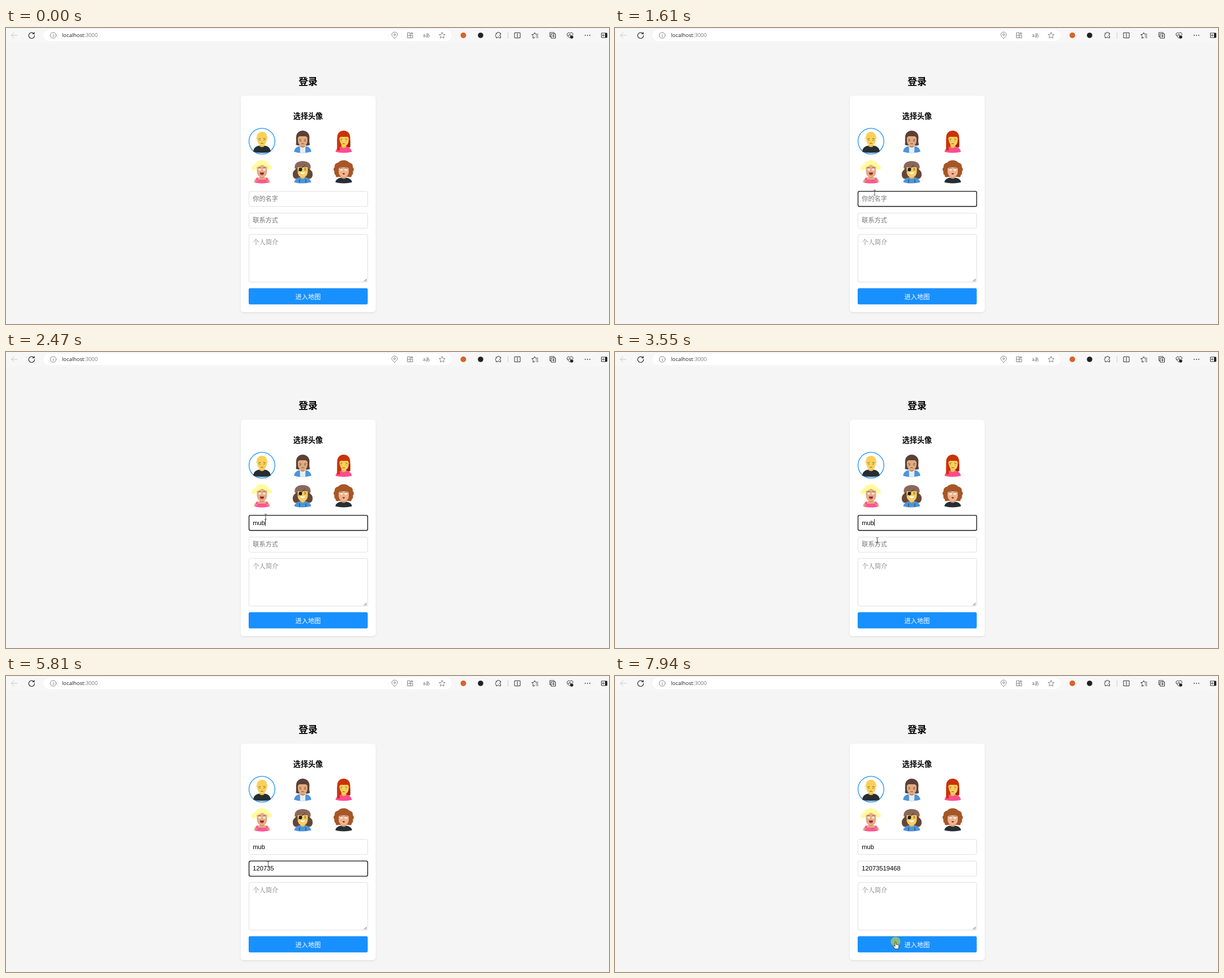
These frames come from a looping animation (1066x525 px, 8 s). An HTML page:

```html
<!DOCTYPE html>
<html lang="zh-CN">
<head>
<meta charset="utf-8">
<title>登录</title>
<style>
html, body { margin: 0; width: 100%; height: 100%; overflow: hidden; background: #f5f5f5; }
svg { display: block; }
text { font: 11.2px "Liberation Sans", "Noto Sans CJK SC", "Noto Sans CJK", sans-serif; white-space: pre; }
.cn { font-family: "Noto Sans CJK SC", "Noto Sans CJK", sans-serif; }
.mid { text-anchor: middle; }
.hint { fill: #757575; }
.box { fill: #fff; stroke: #d9d9d9; stroke-width: .8; }
.box.on { stroke: #101010; stroke-width: 1.3; }
.line { fill: none; stroke: #333; stroke-width: 1; stroke-linecap: round; stroke-linejoin: round; }
.soft { stroke: #777; stroke-width: .9; }
.face { stroke-width: .75; }
</style>
</head>
<body>
<svg width="1066" height="525" viewBox="0 0 1066 525">
  <defs>
    <clipPath id="round"><path d="M-25-25H25V11C21 17 14 20.5 0 20.5S-21 17-25 11Z"/></clipPath>
    <filter id="shade" x="-10%" y="-10%" width="120%" height="120%">
      <feDropShadow dx="0" dy="1.2" stdDeviation="1.8" flood-opacity=".1"/>
    </filter>
  </defs>

  <!-- browser bar -->
  <rect width="1066" height="26" fill="#f7f7f7"/>
  <rect x="65" y="2" width="724" height="22" rx="11" fill="#fff" stroke="#eee" stroke-width=".8"/>
  <g class="line">
    <path d="M19.5 13H9.5M14 8.5 9.5 13 14 17.5" stroke="#c8c8c8"/>
    <path d="M49.5 10.2A5.2 5.2 0 1 0 50.5 13M50 7.5V10.5H47" stroke-width="1.2"/>
    <g class="soft">
      <circle cx="83.5" cy="13" r="5.2"/><path d="M83.5 12.5V15.5M83.5 10.4V10.5"/>
      <path d="M687 18.5C684.5 16 682 14 682 11.8A5 4.6 0 0 1 692 11.8C692 14 689.5 16 687 18.5Z"/><circle cx="687" cy="11.8" r="1.6"/>
      <path d="M710 8.5H714.5V17.5H710ZM710 13H719V17.5H714.5M717.5 7.5V11.5M715.5 9.5H719.5"/>
      <path d="M771 7.8 772.6 11.2 776.3 11.6 773.6 14.2 774.3 18 771 16.1 767.7 18 768.4 14.2 765.7 11.6 769.4 11.2Z"/>
    </g>
    <path d="M866.5 9H869A1.6 1.6 0 0 1 872.2 9H874.5V11.5A1.6 1.6 0 0 0 874.5 14.7V17.5H872A1.6 1.6 0 0 0 868.8 17.5H866.5V15A1.8 1.8 0 0 1 866.5 11.5Z"/>
    <path d="M887.5 8V18" stroke="#ccc"/>
    <path d="M902.5 8.5H899V17.5H902.5M905.5 8.5H909V17.5H905.5M904 7.5V18.5"/>
    <path d="M935 17 931.5 18 932 14.5 929.5 11.7 933 11.2 934.5 8 936.2 11H940.5M937 14H940.5M938 17H940.5"/>
    <path d="M963.5 15.5H961.5V8H969V9.5M964 10.5H971.5V18H964ZM967.8 12.3V16.2M965.8 14.2H969.8"/>
    <path d="M997 18 992.5 13.5A2.9 2.9 0 0 1 997 9.5 2.9 2.9 0 0 1 1002 12.5M993 13H995.5L997 11 998 14"/>
    <path d="M1053 9H1062V17H1053ZM1054.5 13H1058M1056 11.5 1054.5 13 1056 14.5"/>
  </g>
  <circle cx="1000" cy="16" r="2.8" fill="#222"/>
  <path d="M1059 9H1063V17H1059Z" fill="#222"/>
  <g fill="#333"><circle cx="1024" cy="13" r=".9"/><circle cx="1028" cy="13" r=".9"/><circle cx="1032" cy="13" r=".9"/></g>
  <circle cx="808.5" cy="13" r="5" fill="#d9622b"/>
  <circle cx="839" cy="13" r="4.8" fill="#222"/>
  <text x="737" y="16" class="cn" style="font-size:8px" fill="#666">aあ</text>
  <text x="99" y="16.4" style="font:9.35px 'Open Sans', sans-serif" fill="#222">localhost<tspan fill="#777">:3000</tspan></text>

  <!-- form -->
  <text x="534" y="101.4" class="cn mid" style="font-size:16.8px;font-weight:700">登录</text>
  <rect x="415" y="120" width="238.5" height="384" rx="5.6" fill="#fff" filter="url(#shade)"/>
  <text x="534" y="161" class="cn mid" style="font-size:13.1px;font-weight:700">选择头像</text>
  <circle cx="452.5" cy="200.8" r="22.9" fill="none" stroke="#1890ff" stroke-width="1.3"/>

  <g transform="translate(452.5 201)" clip-path="url(#round)">
    <path d="M-15.5 20C-15.5 11-10 8.5-4 7.5H4C10 8.5 15.5 11 15.5 20V22H-15.5Z" fill="#262e33"/>
    <path d="M-4 3H4V9Q0 11.5-4 9Z" fill="#f0be48"/>
    <path d="M0-17C5.5-17 8.8-13 9-8 10-8 10-4 8.6-3.5 8 3.5 4 7.8 0 7.8S-8-3.5-8.6-3.5C-10-4-10-8-9-8-8.8-13-5.5-17 0-17Z" fill="#fad05a"/>
    <path d="M-8.6-3.5C-8 3.5-4 7.8 0 7.8S8 3.5 8.6-3.5Z" fill="#fad05a"/>
    <path class="line face" stroke="#8a6428" d="M-5.8-4-2.8-5.2M5.8-4 2.8-5.2M-4.2-1.8H-3.2M3.2-1.8H4.2M-1.8 3.6Q0 2.4 1.8 3.6"/>
  </g>

  <g transform="translate(524.5 201)" clip-path="url(#round)">
    <path d="M-12 6C-11 1-12-4-11.5-8-11-15-6-19 0-19S11.5-15 12-8C12-3 11 2 13 6 10 8 7 8 5 7H-5C-8 8-10 7-12 6Z" fill="#5a4038"/>
    <path d="M-15.5 21C-15.5 12-10 9.5-5 8.5H5C10 9.5 15.5 12 15.5 21Z" fill="#4c94dc"/>
    <path d="M-5 8.5H5L4.5 21H-4.5Z" fill="#e9edf2"/>
    <path d="M-4 3H4V9.5Q0 13-4 9.5Z" fill="#c98c62"/>
    <path d="M-8.5-9H8.5V-2C8.5 5 4.5 8.5 0 8.5S-8.5 5-8.5-2Z" fill="#e2aa7e"/>
    <path d="M-9-5C-8.5-8-5-9-2-13 2-10 7.5-9.5 9-5L10-13 0-18-10-13Z" fill="#5a4038"/>
    <path class="line face" stroke="#80573a" d="M-5.8-3.4-3-2.6M5.8-3.4 3-2.6M-5.2-.6H-3M5.2-.6H3M-1.8 4.2Q0 3.4 1.8 4.2"/>
  </g>

  <g transform="translate(597 201)" clip-path="url(#round)">
    <path d="M-11.5 16V-7C-11.5-14-7-19 0-19S11.5-14 11.5-6V10Q8 12 4 9V8H-4V16Z" fill="#c93408"/>
    <path d="M7-2H11.5V10Q8 12 5 8Z" fill="#9e2505"/>
    <path d="M-15 21C-14 13-10 10.5-4 9.5H4C10 10.5 14 13 15 21Z" fill="#ff4d8d"/>
    <path d="M-4 3H4V10Q0 14-4 10Z" fill="#f0be48"/>
    <path d="M-8-8H8.8V-2C8.8 5 5 8.5 0 8.5S-8-3-8-8Z" fill="#fad05a"/>
    <path d="M-9-3C-7-8-3-9.5 1-14 3-11 8-9 9.5-4L9-14 0-18-9-14Z" fill="#c93408"/>
    <path d="M-11.5-5H-8L-6.8 16H-11.5Z" fill="#c93408"/>
    <path class="line face" stroke="#8a6428" d="M-5.5-3.2-2.8-4.3M6-3.2 3.2-4.3M-4-1V-.8M4-1V-.8M-1.8 4.4Q0 3.2 1.8 4.4"/>
  </g>

  <g transform="translate(452.5 255)" clip-path="url(#round)">
    <path d="M-18.8-5C-18.5-11-13-12-10.5-16-6-22 6-22 10-16 12.5-12 18-11 18-6 14-3 11-4 9-5H-9C-12-3-16-2-18.8-5Z" fill="#fffb9c"/>
    <path d="M-14.5 21C-14.5 13-10 10.5-4 9.5H4C10 10.5 14.5 13 14.5 21Z" fill="#e8ab83"/>
    <path d="M-10 10.5H-7V14H7V10.5H10L12 21H-12Z" fill="#ff5591"/>
    <path d="M-4 4H4V10Q0 13-4 10Z" fill="#d2916a"/>
    <path d="M-9-9Q0-16 9-9V-1C9 6 5 10 0 10S-9 6-9-1Z" fill="#e8ab83"/>
    <path d="M-10-8.5Q-4-9 0-13 5-9 10-8.5V-15H-10Z" fill="#fffb9c"/>
    <g fill="#fff"><circle cx="-3.8" cy="-4" r="2.1"/><circle cx="3.8" cy="-4" r="2.1"/></g>
    <path class="line face" stroke="#6b4632" d="M-6-7Q-4-7.8-2.5-7M6-7Q4-7.8 2.5-7M-3.8-4V-3.9M3.8-4V-3.9"/>
    <path d="M-3.6 1.6H3.6Q3.2 6 0 6T-3.6 1.6Z" fill="#7b2530"/><path d="M-2 4.8Q0 3.2 2 4.8 0 6.6-2 4.8Z" fill="#ff5a68"/>
    <path d="M-9.5 16V16.1M9 16V16.1" stroke="#fff" stroke-width="1.3" stroke-linecap="round"/>
  </g>

  <g transform="translate(524.5 255)" clip-path="url(#round)">
    <path d="M-11-9C-12-2-17.5-3-17.5 4-18 10-14 14-9 12L0 8 9 12C14 14 18 10 17.5 4 17.5-3 12-2 11-9Z" fill="#66463a"/>
    <path d="M-15.5 21C-15 14-10 11-5 9.5H5C10 11 15 14 15.5 21Z" fill="#4c94dc"/>
    <path d="M-4 4H4V10Q0 15-4 10Z" fill="#f0be48"/>
    <path d="M-9-8H9V-1C9 6 5 10 0 10S-9 6-9-1Z" fill="#fad05a"/>
    <path d="M-14-6C-15-14-10-19 0-19S15-14 14-6Q10-4 9-8H-9Q-10-4-14-6Z" fill="#8b675a"/>
    <path class="line" stroke="#222" d="M-8-1 4-12"/><ellipse cx="-4" cy="-4" rx="3" ry="3.2" fill="#1d1d1d"/>
    <path d="M-5 .8H5Q4.5 4.6 0 4.6T-5 .8Z" fill="#fff" stroke="#c9b078" stroke-width=".5"/>
    <path class="line face" stroke="#6b4a20" d="M2.8-6 6-5.2M2.8-3Q4.5-4.2 6-3"/>
    <path class="line" stroke="#fff" d="M-5.5 14V19M5.5 14V19"/>
  </g>

  <g transform="translate(597 255)" clip-path="url(#round)">
    <path d="M-9 9C-13 11-15 8-14 6-17 5-17 1-16 0-19-3-18-7-16-8-17-13-13-16-10-16-6-22 6-22 10-16 13-16 17-13 16-8 18-7 19-3 16 0 17 1 17 5 14 6 15 8 13 11 9 9Z" fill="#a65728"/>
    <path d="M-15 21C-15 14-10 11.5-5 10.5H5C10 11.5 15 14 15 21Z" fill="#262e33"/>
    <path d="M-4 4H4V11Q0 14-4 11Z" fill="#d99670"/>
    <path d="M-9-8H9V-1C9 6 5 10 0 10S-9 6-9-1Z" fill="#efb48d"/>
    <path d="M-10-4C-8-8-3-8.5 1-12 4-8.5 8-8 10-4L12-12 0-18-12-12Z" fill="#a65728"/>
    <g fill="#fff"><circle cx="-3.8" cy="-3.5" r="2"/><circle cx="3.8" cy="-3.5" r="2"/></g>
    <path class="line face" stroke="#6b4632" d="M-6-6.4Q-4-7.2-2.6-6.4M6-6.4Q4-7.2 2.6-6.4M-3.8-3.5V-3.4M3.8-3.5V-3.4"/>
    <path d="M-2.2 2.6H2.2Q1.6 5 0 5T-2.2 2.6Z" fill="#7b2530"/>
  </g>

  <rect class="box" x="429.6" y="289.6" width="209.8" height="26.9" rx="2.6"/>
  <rect class="box" x="429.6" y="328.2" width="209.8" height="26.9" rx="2.6"/>
  <rect class="box" x="429.6" y="366.2" width="209.8" height="84.5" rx="2.6"/>
  <text class="field" x="436.3" y="306.6"/>
  <text class="field" x="436.3" y="345.3"/>
  <path id="under" d="M436.5 309H446" stroke="#333" stroke-width=".6"/>
  <text class="hint" x="436.5" y="384" style="font-family:'Noto Serif CJK SC','Noto Sans CJK SC','Noto Sans CJK',serif;font-weight:300">个人简介</text>
  <path d="M633 449.5 637.5 445M636 449.5 637.5 448" stroke="#333" stroke-width=".9"/>
  <rect x="429" y="461.5" width="210.5" height="28.7" rx="2.8" fill="#1890ff"/>
  <text x="534" y="481" class="cn mid" fill="#fff">进入地图</text>
  <rect id="caret" width=".9" height="12.4" fill="#111"/>

  <g id="ime"></g>

  <circle id="press" r="8.6" fill="#ffe600" opacity=".5"/>
  <g stroke-linejoin="round" id="pointer">
    <path id="arrow" d="M0 0V11L2.6 8.8 4.3 12.6 6 11.8 4.3 8.2H7.6Z" fill="#fff" stroke="#222" stroke-width=".8"/>
    <path id="beam" d="M-2-4.6H-.6L0-4 .6-4.6H2M0-4V4M-2 4.6H-.6L0 4 .6 4.6H2" fill="none" stroke="#444" stroke-width=".9"/>
    <path id="hand" d="M-1 1Q0-.6 1 1V5L5 6Q6.4 6.5 6 8.5L5 13H-1L-4.2 8.5Q-4.6 6.8-3 7.2L-1 8.8Z" fill="#fff" stroke="#222" stroke-width=".8"/>
  </g>
</svg>
<script>
const $ = id => document.getElementById(id);
const LOOP = 8000, NAME = 'mub', PHONE = '12073519468';
const hints = ['你的名字', '联系方式'];
const boxes = document.querySelectorAll('.box'), fields = document.querySelectorAll('.field');

// time, focused field, name letters, phone digits, caret
const states = [
  [0, -1, 0, 0, 0], [1070, 0, 0, 0, 1], [1610, 0, 0, 0, 0], [1880, 0, 1, 0, 1],
  [2000, 0, 2, 0, 1], [2140, 0, 3, 0, 1], [3010, 0, 3, 0, 0], [3540, 0, 3, 0, 1],
  [3750, 1, 3, 0, 1], [4290, 1, 3, 0, 0], [4350, 1, 3, 1, 1], [4550, 1, 3, 2, 1],
  [4680, 1, 3, 3, 1], [4880, 1, 3, 4, 1], [5020, 1, 3, 5, 1], [5290, 1, 3, 6, 1],
  [5810, 1, 3, 6, 0], [6010, 1, 3, 8, 1], [6210, 1, 3, 9, 1], [6410, 1, 3, 10, 1],
  [6540, 1, 3, 11, 1], [7070, 1, 3, 11, 0], [7600, 1, 3, 11, 1], [7940, -1, 3, 11, 0]
];
// time, x, y, shape
const moves = [
  [0, 0, 0, ''], [330, 741, 453, 'arrow'], [400, 655, 396, 'arrow'], [470, 550, 322, 'arrow'],
  [530, 460, 262, 'hand'], [600, 424, 239.5, 'arrow'], [740, 423, 245, 'arrow'],
  [800, 441, 274, 'hand'], [870, 459, 292, 'beam'], [3220, 459, 294, 'beam'],
  [3280, 460, 301, 'beam'], [3350, 461, 311, 'beam'], [3410, 462, 322, 'arrow'],
  [3480, 463, 330, 'beam'], [3540, 463.5, 334, 'beam'], [7400, 465, 346, 'beam'],
  [7470, 473, 390, 'beam'], [7540, 485, 438, 'beam'], [7600, 493, 465, 'hand'], [7670, 496, 471, 'hand']
];
const presses = [[1070, 1200], [3750, 3810], [7940, LOOP]];
// time, right edge, candidates
const lists = [
  [0], [1940, 764, '吗 没 么 嘛 买 们 秒'], [2000, 769, '木 目 母 幕 亩 墓 牧'],
  [2140, 851, '目标 木板 幕布 母本 墓碑 木棒 木本'], [2470]
];

const at = (list, t) => list.findLast(e => e[0] <= t);
const show = (el, on) => el.setAttribute('visibility', on ? 'visible' : 'hidden');

function imeMarkup([, right, words]) {
  if (!words) return '';
  const left = 434, end = right - 31, step = (end - left) / 7;
  const items = words.split(' ').map((w, i) => {
    const x = left + i * step + 11.5;
    return `<text class="cn" x="${x}" y="331.6" style="font-size:8.4px" fill="${i ? '#777' : '#fff'}">${i + 1}</text>
      <text class="cn" x="${x + 7.7}" y="331.8" style="font-size:12.9px" fill="${i ? '#000' : '#fff'}">${w}</text>`;
  });
  return `<rect x="434.4" y="311.4" width="${right - 434.8}" height="30" fill="#fff" stroke="#2b88cf" stroke-width=".9"/>
    <rect x="434" y="311" width="${step}" height="30.8" fill="#0078d7"/>${items.join('')}
    <path d="M${end + .4} 311V341.5" stroke="#2b88cf" stroke-width=".9"/>
    <g class="line" transform="translate(${right - 15.5} 326.6)"><circle r="5.7"/>
    <path d="M-2-1.8V-1.7M2-1.8V-1.7M-2.8 1.5Q0 4.4 2.8 1.5"/></g>`;
}

let lastList;
function draw(t) {
  const [, focus, letters, digits, caret] = at(states, t);
  [NAME.slice(0, letters), PHONE.slice(0, digits)].forEach((value, i) => {
    fields[i].textContent = value || hints[i];
    fields[i].setAttribute('class', value ? 'field' : 'field cn hint');
    boxes[i].classList.toggle('on', focus === i);
    if (focus === i) {
      $('caret').setAttribute('x', 436.3 + (value ? fields[i].getComputedTextLength() : 0));
      $('caret').setAttribute('y', i ? 335 : 296.3);
    }
  });
  show($('caret'), caret);
  show($('under'), t >= 1880 && t < 2470);
  $('under').setAttribute('d', `M436.5 309H${436.3 + fields[0].getComputedTextLength()}`);

  const list = at(lists, t);
  if (list !== lastList) $('ime').innerHTML = imeMarkup(lastList = list);

  const [, x, y, shape] = at(moves, t);
  $('pointer').setAttribute('transform', `translate(${x} ${y})`);
  for (const id of ['arrow', 'beam', 'hand']) show($(id), id === shape);
  $('press').setAttribute('cx', x);
  $('press').setAttribute('cy', y);
  show($('press'), presses.some(([a, b]) => t >= a && t < b));
}

const start = performance.now();
function tick() {
  draw((performance.now() - start) % LOOP);
  requestAnimationFrame(tick);
}
tick();
</script>
</body>
</html>
```
